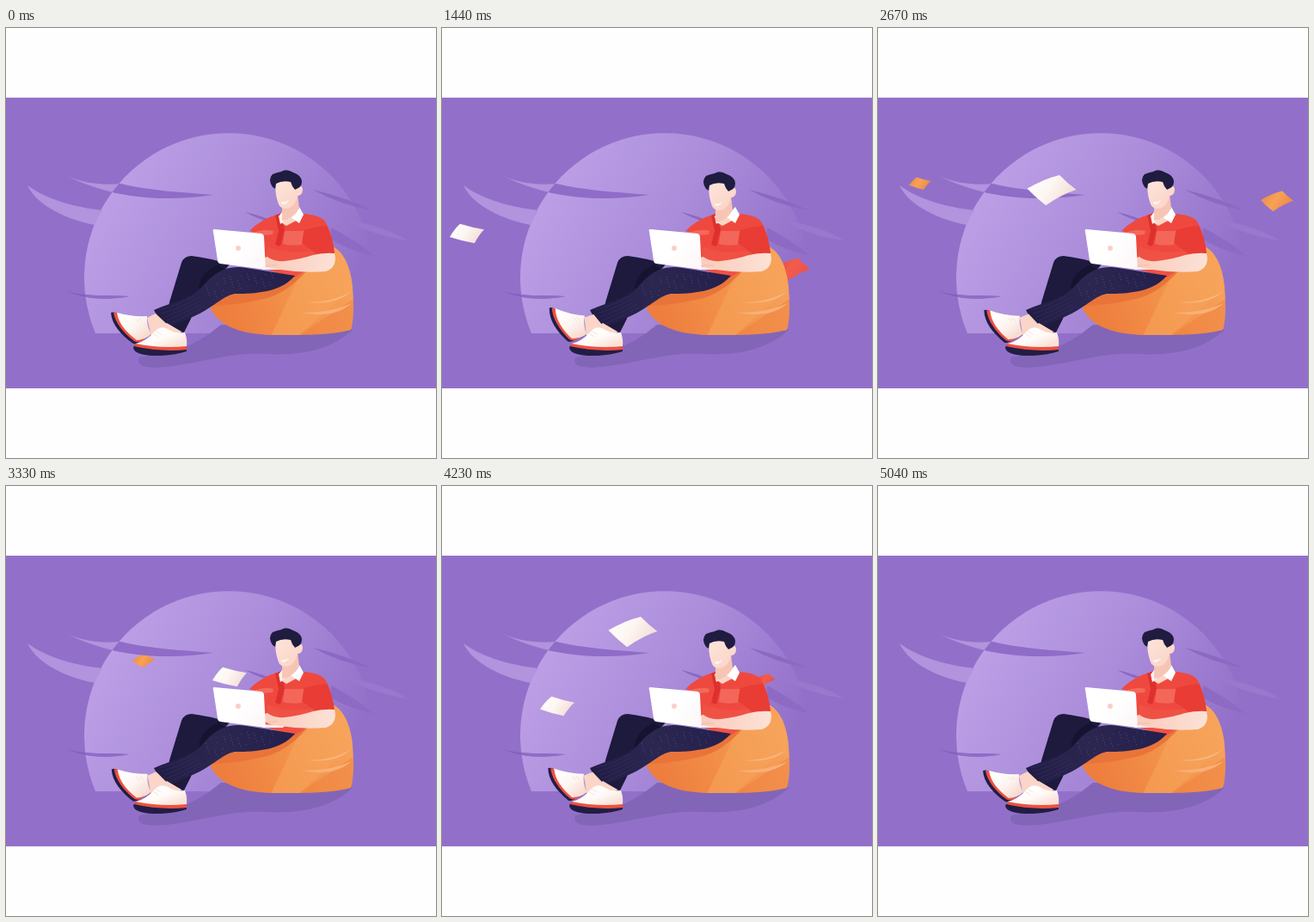
These frames come from a looping animation (500x500 px, 5.43 s). An HTML page with a canvas:

```html
<!DOCTYPE html>
<html lang="en">
<head>
<meta charset="utf-8">
<title>Working on a beanbag</title>
<style>
html, body { margin: 0; width: 100%; height: 100%; overflow: hidden; background: #fefefe; }
canvas { display: block; width: 500px; height: 500px; }
</style>
</head>
<body>
<canvas id="stage" width="500" height="500"></canvas>
<script>
const ctx = document.getElementById('stage').getContext('2d');
const LOOP = 5430, STEP = 30, START = 870, END = 5040;
const PURPLE = '#9270c9', LILAC = '#b193de', NAVY = '#211d45', SKIN = '#fbd5c7', RED = '#ef493f';

function shape(d, fill) {
  ctx.fillStyle = fill;
  ctx.fill(new Path2D(d));
}

function line(d, color, width = 1) {
  ctx.strokeStyle = color;
  ctx.lineWidth = width;
  ctx.lineCap = 'round';
  ctx.stroke(new Path2D(d));
}

function gradient(x0, y0, x1, y1, ...colors) {
  const g = ctx.createLinearGradient(x0, y0, x1, y1);
  colors.forEach((c, i) => g.addColorStop(i / (colors.length - 1), c));
  return g;
}

function group(draw) {
  ctx.save();
  draw();
  ctx.restore();
}

// Smooth curve through rows of [time, ...values]; null outside their time span.
function track(keys, t) {
  const last = keys.length - 1;
  if (t < keys[0][0] || t > keys[last][0]) return null;
  let i = 0;
  while (i < last - 1 && t > keys[i + 1][0]) i++;
  const a = keys[i], b = keys[i + 1];
  const before = keys[Math.max(i - 1, 0)], after = keys[Math.min(i + 2, last)];
  const span = b[0] - a[0], u = (t - a[0]) / span;
  return a.slice(1).map((v, k) => {
    const n = k + 1, w = b[n];
    const m0 = (w - before[n]) / (b[0] - before[0]) * span;
    const m1 = (after[n] - v) / (after[0] - a[0]) * span;
    return v + u * (m0 + u * (3 * (w - v) - 2 * m0 - m1 + u * (2 * (v - w) + m0 + m1)));
  });
}

function ease(keys, t) {
  for (let i = 1; i < keys.length; i++) {
    const [t0, a] = keys[i - 1], [t1, b] = keys[i];
    if (t <= t1) {
      const u = Math.max(0, (t - t0) / (t1 - t0));
      return a + (b - a) * u * u * (3 - 2 * u);
    }
  }
  return keys[keys.length - 1][1];
}

// Lane rows: time, x, y, width, lean
const HIGH = [
  [-50, -20, 150, 22, 1], [100, 58, 184, 26, 0.8], [300, 137, 201, 37, 0],
  [360, 160, 203, 27, 0.4], [480, 202, 188, 57, 0], [540, 222, 169, 57, 0],
  [640, 248, 186, 50, 0.4], [740, 260, 222, 40, 1], [830, 268, 253, 34, 1]
];
const LOW = [
  [-110, -30, 226, 38, 1], [0, 29, 239, 40, 1], [210, 134, 256, 40, 0.9],
  [450, 261, 238, 42, 0.8], [510, 270, 254, 38, 0.8]
];
const OUT = [[0, 352, 244, 18, 0], [80, 376, 225, 23, 0], [300, 464, 201, 38, 0], [440, 525, 184, 38, 0]];

const incoming = [
  { lane: HIGH, at: 1590, lift: 14 }, { lane: HIGH, at: 1790, lift: 10 },
  { lane: HIGH, at: 2190, lift: 0 }, { lane: HIGH, at: 2590, lift: 0 },
  { lane: HIGH, at: 2970, lift: 28 }, { lane: HIGH, at: 3690, lift: 0 },
  { lane: LOW, at: 1440, lift: 0 }, { lane: LOW, at: 4020, lift: 0 }
];
const outgoing = [
  { at: 1280, drop: 65 }, { at: 2000, drop: 20 }, { at: 2370, drop: 0 },
  { at: 3390, drop: 10 }, { at: 4150, drop: 0 }, { at: 4600, drop: 8 }
];

const CORNERS = [[-.5, -.02], [.16, -.3], [.5, 0], [-.12, .32]];
const LEANED = [[-.5, .1], [-.2, -.28], [.5, -.12], [.22, .28]];
const TINTS = {
  white: ['#ffffff', '#fdf6f2', '#f3ddd6'],
  orange: ['#ee8a42', '#f6a257', '#ee8943'],
  red: ['#e8453e', '#f25c4c', '#ee5145']
};

function sheet([x, y, w, lean], tint) {
  const [a, b, c, d] = CORNERS.map((p, i) =>
    p.map((v, k) => (k ? y : x) + w * (v + (LEANED[i][k] - v) * lean)));
  const edge = (p, q, bend) => `Q${(p[0] + q[0]) / 2} ${(p[1] + q[1]) / 2 + bend} ${q[0]} ${q[1]}`;
  const d0 = `M${a}${edge(a, b, -w * .06)}${edge(b, c, w * .03)}${edge(c, d, -w * .06)}${edge(d, a, w * .03)}Z`;
  shape(d0, gradient(a[0], y - w * .2, c[0] - w * .2, y + w * .3, ...TINTS[tint]));
}

function drawIncoming(t, wanted) {
  for (const { lane, at, lift } of incoming) {
    const age = t - at, pose = track(lane, age);
    if (!pose) continue;
    const tint = lane === HIGH && age <= 400 ? 'orange' : 'white';
    if (tint !== wanted) continue;
    if (lane === HIGH && age > 400 && age < 720) pose[1] -= lift * Math.sin((age - 400) / 320 * Math.PI);
    sheet(pose, tint);
  }
}

function drawOutgoing(t) {
  for (const { at, drop } of outgoing) {
    const pose = track(OUT, t - at);
    if (!pose) continue;
    pose[1] += drop;
    if (drop > 50) pose[2] += 14;
    sheet(pose, pose[0] < 425 ? 'red' : 'orange');
  }
}

const SUN = 'M104 355 A168 168 0 1 1 414 355 Z';
const STREAKS = [
  'M69 171 C90 181 112 183 133 181 C165 189 205 191 241 194 C190 202 125 200 69 171Z',
  'M70 306 C95 313 118 310 143 312 C118 317 90 315 70 306Z'
];

function backdrop() {
  shape('M0 81H500V419H0Z', PURPLE);
  shape(SUN, gradient(125, 175, 385, 325, '#bc9fe6', '#aa8cda', PURPLE));
  shape('M155 383 C151 394 164 396 187 394 C230 389 262 377 300 379 C350 382 382 371 404 350 L250 345 Q225 366 200 374Z', '#8365b8');
}

function streaks() {
  shape('M25 183 C48 200 83 209 112 212 Q106 220 103 229 C72 223 36 207 25 183Z', LILAC);
  STREAKS.forEach((d, i) => shape(d, i ? '#8262bc' : LILAC));
  group(() => {
    ctx.clip(new Path2D(SUN));
    STREAKS.forEach(d => shape(d, '#8f6cc7'));
  });
  shape('M278 214 Q298 218 320 229 Q296 224 278 214Z', '#8b68c3');
  shape('M357 188 Q395 197 426 212 Q387 205 357 188Z', '#8b69c3');
  shape('M395 223 Q440 230 467 247 Q425 241 395 223Z', '#9a78ce');
  shape('M378 232 Q407 247 428 265 Q397 258 378 246Z', '#8d6bc5');
}

function beanbag() {
  const body = 'M235 317 C262 305 305 312 338 286 L382 255 C399 267 404 292 404 322 Q404 342 401 351 C374 358 338 357 310 357 C268 356 241 344 235 317Z';
  shape(body, gradient(260, 345, 395, 290, '#ee7e3e', '#f29049', '#f6a15a'));
  group(() => {
    ctx.clip(new Path2D(body));
    shape('M235 317 C262 305 305 312 338 286 L350 282 Q326 309 300 315 Q265 323 238 323Z', '#e97439');
    shape('M338 294 L308 358 H340 L404 301 V255 L375 258Z', 'rgba(248,166,91,.55)');
    shape('M404 315 L340 358 H410Z', 'rgba(235,121,56,.4)');
  });
  shape('M349 319 Q382 319 401 306 Q387 322 349 319Z', '#f9b77f');
  shape('M344 331 Q378 331 402 320 Q382 338 344 331Z', '#f8b077');
}

function farShoe(tilt) {
  group(() => {
    ctx.translate(168, 350);
    ctx.rotate(tilt * .13);
    ctx.translate(-168, -350);
    shape('M164 337 L174 332 L190 347 L169 358Z', SKIN);
    shape('M122 331 Q128 329 133 336 L157 364 Q153 368 148 367 C134 357 123 345 122 331Z', NAVY);
    shape('M125 331 Q133 330 137 340 L162 360 Q156 368 149 364 C137 355 127 343 125 331Z', '#ee5140');
    shape('M129 331 Q146 336 164 335 Q163 346 169 356 Q161 363 152 363 C140 354 131 344 129 331Z',
      gradient(135, 335, 160, 362, '#ffffff', '#fdf5f1', '#f8d9cd'));
    line('M151 339 L155 342 M155 338 L159 341', '#f3d9d0', .8);
  });
}

function nearShoe() {
  shape('M178 350 L187 343 L204 353 L198 360Z', SKIN);
  shape('M148 372 Q149 367 156 368 L210 370 L210 376 Q198 380 181 381 Q150 382 148 372Z', NAVY);
  shape('M149 370 Q151 365 158 367 L210 368 L210 374 Q180 377 149 370Z', '#ee5140');
  shape('M151 367 Q162 365 174 352 Q181 345 190 351 Q198 356 208 354 Q211 362 210 370 Q180 373 151 367Z',
    gradient(175, 350, 185, 374, '#ffffff', '#fffaf7', '#fae2d8'));
  line('M172 356 L177 359 M175 353 L180 356', '#f3d9d0', .8);
}

function legs() {
  shape('M260 275 Q235 267 216 265 Q207 265 204 273 L190 319 L186 343 Q196 353 207 354 L215 338 L226 304 L245 292Z', '#1d1a3e');
  shape('M224 303 Q226 284 247 275 L258 283 L233 305Z', '#15132f');
  shape('M336 288 C320 307 292 309 266 309 C251 312 240 326 219 335 Q202 343 187 348 Q178 340 172 328 C195 318 215 315 227 302 C243 283 257 275 280 279Z',
    gradient(180, 340, 320, 285, '#211d45', '#2b2751', '#25214c'));
  for (let i = 0; i < 5; i++)
    line(`M${178 + i * 3} ${328 + i * 4} Q${204 + i * 2} ${321 + i * 3} ${218 + i * 3} ${312 + i * 3}`, '#36325f', .6);
  ctx.fillStyle = '#5b568a';
  for (let i = 0; i < 42; i++) {
    const x = 232 + i * 37 % 83, y = 291 + i * 23 % 17 - (x - 232) * .1 + (x < 252 ? 8 : 0);
    ctx.fillRect(x, y, 1, .7);
  }
}

function torso() {
  shape('M283 236 Q297 222 315 217 L344 216 Q365 217 371 225 Q379 237 382 262 Q374 267 359 266 L352 279 L335 290 Q315 286 300 278 L298 240Z', RED);
  shape('M304 254 Q330 265 359 258 L355 278 L335 290 L301 280Z', '#f05145');
  shape('M347 235 Q358 231 373 230 Q380 244 382 262 Q369 266 359 261 L344 250Z', '#e83c34');
  shape('M324 236 H346 L344 252 Q331 254 322 251Z', '#f3675a');
  shape('M284 239 Q300 233 311 236 L310 240 L298 241Z', '#f3695e');
  shape('M313 218 L320 215 L324 235 L319 254 L313 252 L317 236Z', '#dd302f');
  shape('M318 225 L332 213 L341 222 L326 230Z', SKIN);
  shape('M331 220 L341 208 L346 217 L341 227Z', '#ffffff');
  shape('M317 219 L321 214 L326 222 L319 228Z', '#fff4f0');
}

function head(nod) {
  group(() => {
    ctx.translate(-3 * nod, 2 * nod);
    shape('M321 202 L339 193 L341 210 Q333 223 321 224Z', '#f7c5b5');
    shape('M314 178 L336 177 L339 184 Q345 182 345 189 Q344 195 339 195 Q336 209 325 210 Q318 210 316 202 Q312 190 314 178Z',
      gradient(315, 180, 340, 205, '#fde3d9', '#fbd5c8'));
    shape('M310 185 Q304 176 310 170 Q315 168 320 167 Q326 163 334 168 Q343 171 344 178 Q344 184 340 186 L336 188 L333 184 L331 179 Q321 177 314 181 L313 187Z', '#1f1c40');
    shape('M320 202 Q325 203 329 200 Q326 206 321 205Z', '#fff4ef');
  });
}

function laptopAndArm(raise) {
  shape('M290 277 L325 278 L322 281 L300 281Z', '#f4ecec');
  group(() => {
    ctx.translate(0, -2 * raise);
    shape('M357 264 Q370 261 382 262 Q386 278 372 283 Q344 285 319 281 Q306 280 301 276 Q296 267 304 266 Q311 272 324 271 Q342 269 357 264Z',
      gradient(300, 270, 383, 276, '#f9cbbb', '#fbd6c8', '#fce2d7'));
    line('M304 276 L316 276', '#f0b5a5', .7);
  });
  shape('M242 234 L297 239 Q300 240 300 243 L302 281 L249 274 Q246 273 246 270 L241 237 Q240 234 242 234Z',
    gradient(243, 235, 300, 280, '#ffffff', '#ffffff', '#fcf6f7'));
  ctx.fillStyle = '#f9d0c9';
  ctx.beginPath();
  ctx.arc(270, 256, 3, 0, Math.PI * 2);
  ctx.fill();
}

const NOD = [[870, 0], [1350, 1], [1700, 1], [2250, 0], [3450, 0], [4100, 1], [4400, 1], [4980, 0]];
const TAP = [[870, 0], [1380, 1], [1950, 1], [2670, .5], [3330, .3], [4230, .5], [5040, 0]];
const RAISE = [[3000, 0], [3330, 1], [3700, 0]];

function render(t) {
  ctx.fillStyle = '#fefefe';
  ctx.fillRect(0, 0, 500, 500);
  const flying = t >= START && t < END;
  group(() => {
    ctx.beginPath();
    ctx.rect(0, 81, 500, 338);
    ctx.clip();
    backdrop();
    if (flying) drawIncoming(t, 'orange');
    streaks();
    if (flying) drawOutgoing(t);
    beanbag();
    torso();
    head(ease(NOD, t));
    legs();
    farShoe(ease(TAP, t));
    nearShoe();
    if (flying) drawIncoming(t, 'white');
    laptopAndArm(ease(RAISE, t));
  });
}

const began = performance.now();
function tick() {
  const t = (performance.now() - began) % LOOP;
  render(Math.floor(t / STEP) * STEP);
  requestAnimationFrame(tick);
}
tick();
</script>
</body>
</html>
```
